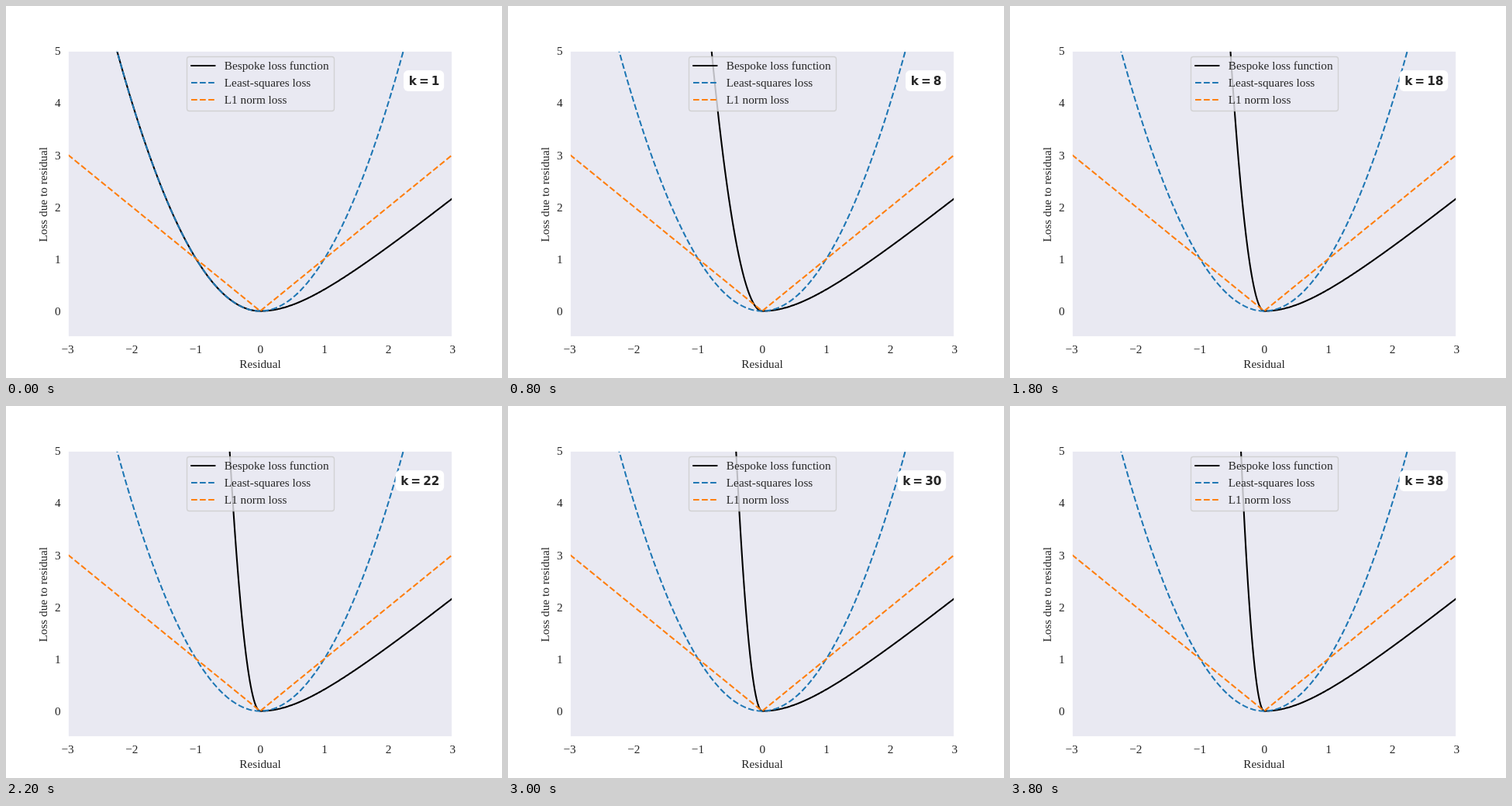
Recreate the animation shown at these times as an HTML page. Size 640 by 480 pixels, loop 4 s.

```html
<!DOCTYPE html>
<html lang="en">
<head>
<meta charset="utf-8">
<title>Loss functions</title>
<style>
  html, body { margin: 0; width: 100%; height: 100%; overflow: hidden; background: #fff; }
  svg { display: block; }
  text { font: 15.28px "Liberation Serif", "Times New Roman", serif; fill: #262626; }
  #label { font: bold 15.28px "DejaVu Sans", sans-serif; word-spacing: -2.3px; text-anchor: end; }
  .mid { text-anchor: middle; }
  .end { text-anchor: end; }
  .line { fill: none; stroke-width: 2.08; stroke-linejoin: round; }
  .dash { stroke-dasharray: 7.71 3.33; }
  .black { stroke: #000; stroke-linecap: round; }
  .blue { stroke: #1f77b4; }
  .orange { stroke: #ff7f0e; }
</style>
</head>
<body>
<svg width="640" height="480" viewBox="0 0 640 480">
  <clipPath id="area"><rect x="80" y="57.6" width="496" height="369.6"/></clipPath>
  <rect x="80" y="58" width="496" height="369" fill="#e9e9f2"/>
  <g clip-path="url(#area)">
    <path id="bespoke" class="line black"/>
    <path id="squares" class="line dash blue"/>
    <path id="norm" class="line dash orange"/>
  </g>
  <rect x="80" y="58" width="496" height="369" fill="none" stroke="#fff" stroke-width="1.74"/>
  <g id="ticks"></g>
  <text class="mid" x="328" y="467">Residual</text>
  <text class="mid" transform="translate(53 243.3) rotate(-90)">Loss due to residual</text>
  <rect id="badge" y="83" height="27" rx="6" fill="#fff"/>
  <text id="label" x="559.4" y="102"></text>
  <rect x="233.5" y="65.5" width="190" height="70" rx="3" fill="#eaeaf2" stroke="#ccc"
        stroke-width="1.39" opacity=".8"/>
  <g id="legend"></g>
</svg>
<script>
  const $ = id => document.getElementById(id);
  const px = x => 328 + x * 496 / 6;
  const py = y => 393.6 - y * 67.2;

  function curve(f, from, to, steps) {
    const points = [];
    for (let i = 0; i <= steps; i++) {
      const x = from + (to - from) * i / steps;
      points.push(px(x).toFixed(2) + ' ' + py(f(x)).toFixed(2));
    }
    return 'M' + points.join('L');
  }

  const text = (cls, x, y, s) => `<text class="${cls}" x="${x}" y="${y}">${s}</text>`;
  const sign = n => n < 0 ? '\u2212' + -n : n;

  let ticks = '';
  for (let n = -3; n <= 3; n++) ticks += text('mid', px(n) + (n < 0 ? -.4 : .3), 448, sign(n));
  for (let n = 0; n <= 5; n++) ticks += text('end', 70.7, Math.round(py(n) + 5.6), n);
  $('ticks').innerHTML = ticks;

  $('legend').innerHTML = [
    ['black', 'Bespoke loss function'],
    ['dash blue', 'Least-squares loss'],
    ['dash orange', 'L1 norm loss']
  ].map(([cls, name], i) =>
    `<path class="line ${cls}" d="M239 ${77 + 22 * i}h30.6"/>` + text('', 281.8, 82 + 22 * i, name)
  ).join('');

  // The parabola starts at the top edge of the stage, which sets its dash phase.
  const edge = Math.sqrt(394.6 / 67.2);
  $('squares').setAttribute('d', curve(x => x * x, -edge, edge, 200));
  $('norm').setAttribute('d', curve(Math.abs, -3, 3, 2));

  let shown = 0;
  function draw(now) {
    const k = Math.max(1, 2 * (Math.floor(now / 200) % 20));
    if (k !== shown) {
      shown = k;
      const loss = x => x < 0 ? k * x * x : Math.sqrt(1 + x * x) - 1;
      $('bespoke').setAttribute('d', curve(loss, -3, 3, 600));
      $('label').textContent = 'k = ' + k;
      const left = k < 10 ? 513 : 502.6;
      $('badge').setAttribute('x', left);
      $('badge').setAttribute('width', 565.2 - left);
    }
  }

  const start = performance.now();
  function tick() {
    draw(performance.now() - start);
    requestAnimationFrame(tick);
  }
  tick();
</script>
</body>
</html>
```
